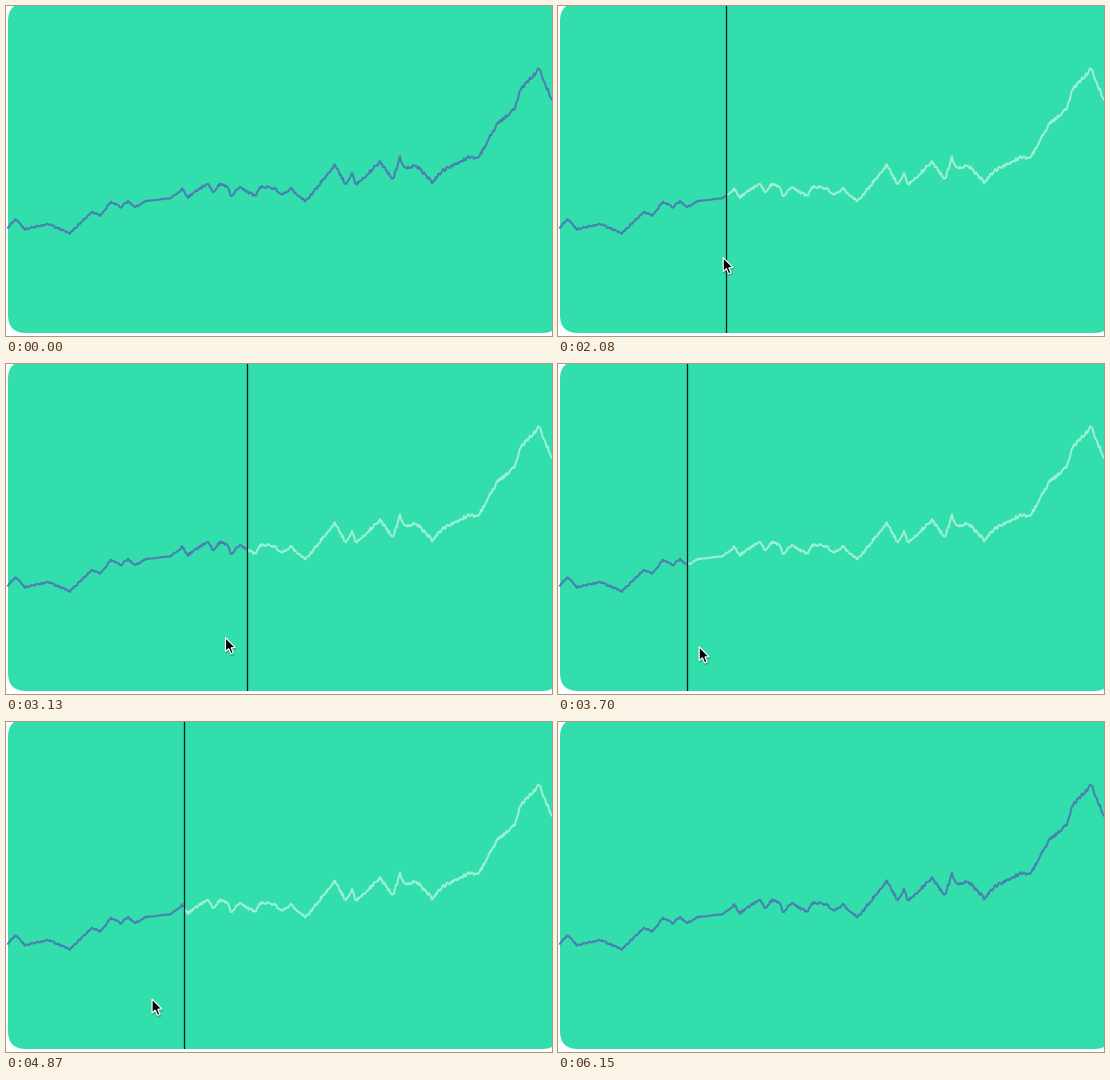
These frames come from a looping animation (546x330 px, 6.57 s). A matplotlib script:

```python
import numpy as np
import matplotlib.pyplot as plt
from matplotlib.animation import FuncAnimation
from matplotlib.patches import FancyBboxPatch, Polygon

W, H, DPI = 546, 330, 100
LOOP, INTERVAL = 6570, 30
STEP = 57.5            # pointer sampling period, ms
PX = 72 / DPI          # one pixel in points
GREEN, BLUE, PALE = "#32deab", "#4a7fb1", "#9cf0d7"

# Main turns of the price curve; seeded roughness fills in the rest
TURNS = [
    (2, 221), (10, 213), (19, 223), (42, 218), (64, 227), (86, 206),
    (94, 210), (105, 196), (115, 201), (122, 195), (129, 201), (140, 195),
    (165, 192), (176, 183), (182, 191), (202, 177), (207, 186), (214, 178),
    (222, 181), (225, 190), (233, 181), (249, 190), (254, 181), (268, 182),
    (276, 188), (285, 183), (300, 195), (329, 159), (340, 179), (346, 168),
    (350, 179), (374, 156), (387, 174), (394, 152), (399, 162), (411, 160),
    (426, 176), (436, 165), (461, 152), (473, 151), (491, 118), (509, 103),
    (515, 83), (533, 63), (546, 94),
]
# Pointer: x eases between turning points, y drifts
KEYS_X = [
    (360, 540), (475, 523), (600, 523), (620, 531), (803, 531), (1262, 432),
    (1436, 390), (1622, 390), (2025, 169), (2350, 158), (3002, 278),
    (3060, 242), (3117, 220), (3650, 130), (3980, 385), (4352, 385),
    (5100, 77), (5272, 250), (5330, 346), (5733, 476), (6135, 536),
]
KEYS_Y = [
    (360, 237), (475, 227), (803, 228), (2082, 252), (3117, 274),
    (3980, 285), (4410, 285), (5330, 266), (5733, 260), (6135, 330),
]
BURSTS = np.array([360, 620, 860, 1680, 4410])
SHOW, DRAG, HIDE = 360, 860, 6150


def rough_curve():
    rng = np.random.default_rng(4)
    x = np.arange(2, W + 1, 1.0)
    y = np.interp(x, *np.transpose(TURNS))
    calm = 1 - 0.75 * np.exp(-((x - 150) / 18) ** 2)
    size = (0.9 + 1.1 * x / W) * calm
    return x, y + size * rng.uniform(-1, 1, len(x))


def smooth_path(keys):
    """Cubic through the keys that never overshoots them."""
    t, v = np.array(keys, float).T
    d = np.diff(v) / np.diff(t)
    a, b = d[:-1], d[1:]
    same = a * b > 0
    m = np.zeros_like(v)
    m[1:-1][same] = 2 * a[same] * b[same] / (a + b)[same]

    def at(now):
        now = np.clip(now, t[0], t[-1])
        i = min(np.searchsorted(t, now, "right") - 1, len(t) - 2)
        h = t[i + 1] - t[i]
        u = (now - t[i]) / h
        ease = u * u * (3 - 2 * u)
        return (v[i] + (v[i + 1] - v[i]) * ease
                + h * u * (1 - u) * ((1 - u) * m[i] - u * m[i + 1]))
    return at


def sampled(t):
    start = BURSTS[BURSTS <= t][-1]
    return start + (t - start) // STEP * STEP


curve_x, curve_y = rough_curve()
pointer_x = smooth_path(KEYS_X)
pointer_y = smooth_path(KEYS_Y)

fig = plt.figure(figsize=(W / DPI, H / DPI), dpi=DPI, facecolor="white")
ax = fig.add_axes([0, 0, 1, 1])
ax.set(xlim=(0, W), ylim=(H, 0))
ax.axis("off")

ax.add_patch(FancyBboxPatch((2, -3), 552, 330, fc=GREEN, ec="none",
                            boxstyle="round,pad=0,rounding_size=18"))
past, = ax.plot([], [], color=BLUE, lw=2 * PX, zorder=3)
future, = ax.plot([], [], color=PALE, lw=2 * PX, zorder=3)
marker, = ax.plot([], [], color="#04201a", lw=1.3 * PX, zorder=4,
                  solid_capstyle="butt", snap=False)

ARROW = np.array([(0, 0), (0, 14), (3.2, 11), (5.5, 16.2), (7.9, 15.2),
                  (5.7, 10.2), (9.8, 9.9)]) - 0.4
shadow = ax.add_patch(Polygon(ARROW, fc="black", ec="black", lw=2 * PX,
                              alpha=0.14, zorder=5))
arrow = ax.add_patch(Polygon(ARROW, fc="black", ec="white", lw=1.2 * PX,
                             joinstyle="miter", zorder=6))


def split_curve(x):
    y = np.interp(x, curve_x, curve_y)
    left = curve_x < x
    past.set_data(np.append(curve_x[left], x), np.append(curve_y[left], y))
    future.set_data(np.append(x, curve_x[~left]), np.append(y, curve_y[~left]))


def update(i):
    t = i * INTERVAL + 20
    inside = SHOW <= t < HIDE
    dragging = DRAG <= t < HIDE
    for art in (arrow, shadow):
        art.set_visible(inside)
    for art in (marker, future):
        art.set_visible(dragging)
    if inside:
        now = sampled(t)
        tip = np.array([pointer_x(now), pointer_y(now)])
        arrow.set_xy(ARROW + tip)
        shadow.set_xy(ARROW + tip + (0.6, 1.4))
    if dragging:
        # the marker trails the pointer by one sample, on whole pixels
        x = np.round(pointer_x(now - STEP)) - 0.5
        marker.set_data([x, x], [0, 327])
        split_curve(x)
    else:
        past.set_data(curve_x, curve_y)
    return past, future, marker, shadow, arrow


anim = FuncAnimation(fig, update, frames=LOOP // INTERVAL, interval=INTERVAL,
                     repeat=True, repeat_delay=0, blit=False)
plt.show()
```
